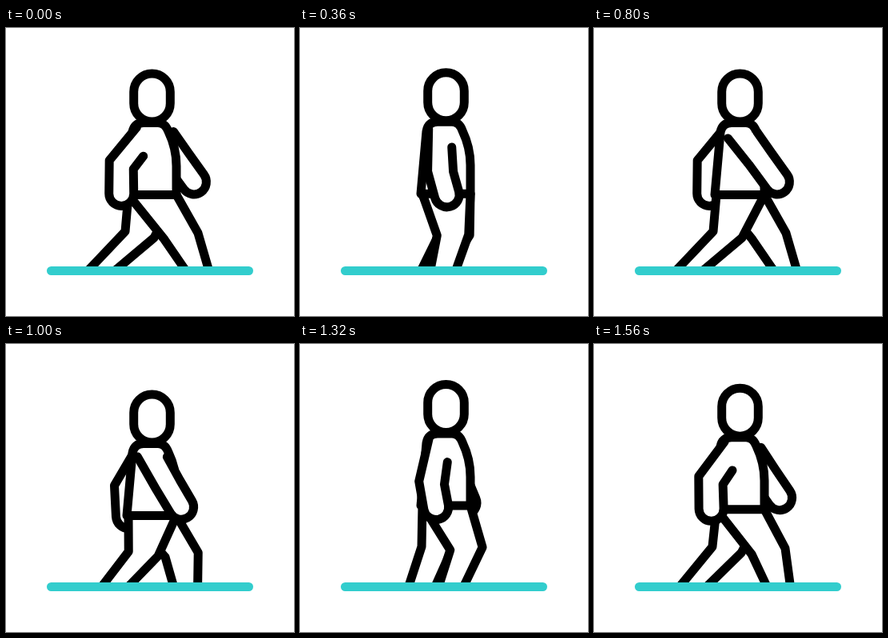
Animation, 360 px wide and 360 px high, one loop 1600 ms. Source, as an HTML page:

```html
<!DOCTYPE html>
<html lang="en">
<head>
<meta charset="utf-8">
<title>Walking figure</title>
<style>
  html, body { margin: 0; width: 100%; height: 100%; overflow: hidden; background: #fff; }
  svg { display: block; width: 100%; height: 100%; }
  .ink { fill: #fff; stroke: #000; stroke-width: 11; stroke-linecap: round; stroke-linejoin: round; }
</style>
</head>
<body>
<svg viewBox="0 0 360 360">
  <g class="ink">
    <path id="farArm"/>
    <path id="farLeg"/>
    <path id="nearLeg"/>
    <g id="body">
      <path d="M213 208H151L158 130Q160 118 172 118H190Q199 118 203 129Q213 150 213 172Z"/>
      <rect x="159.7" y="56.5" width="45.6" height="60" rx="22.8"/>
    </g>
    <path id="nearArm"/>
  </g>
  <path d="M56.5 303.5H303.5" stroke="#32cdcd" stroke-width="11" stroke-linecap="round"/>
</svg>
<script>
const LOOP = 1600, STEP = 40, KEY = 200;
const FLOOR = 298, GROUND = 303.5, HIP = 208;
const RAD = Math.PI / 180;
const el = id => document.getElementById(id);

// Samples a cyclic curve at key poses and joins them linearly.
const keyed = curve => t => {
  const i = Math.floor(t / KEY), k = t / KEY - i;
  const at = n => curve(n * KEY / LOOP * 360);
  return at(i) * (1 - k) + at(i + 1) * k;
};
const cos = deg => Math.cos(deg * RAD);
const sin = deg => Math.sin(deg * RAD);

const swing = keyed(a => cos(a));
const bobAt = keyed(a => -1 + 7.6 * cos(2 * a - 79));
const footX = keyed(a => 177.2 + 52.4 * cos(a - 3) + 6.3 * cos(2 * a - 55) + 7.9 * cos(3 * a - 64));
const kneeX = keyed(a => 192 + 31 * cos(a + 8) + 3.8 * cos(2 * a - 75) + 5.5 * cos(3 * a - 149));

// Moves from p by a length, with the angle measured from straight down.
const reach = (p, len, deg) => [p[0] + len * sin(deg), p[1] + len * cos(deg)];

// The two ends of a cut across a limb.
const cut = (p, half, deg) => [-half, half].map(h => [p[0] + h * cos(deg), p[1] + h * sin(deg)]);

const poly = points => "M" + points.map(p => p.join(" ")).join("L");

function legPath(t, bob) {
  const s = swing(t), knee = kneeX(t), foot = footX(t);
  const edge = (hip, side) => {
    const kx = knee + side * (19.5 + 1.5 * s);
    const ky = 259 + 0.6 * bob + (side < 0 ? 5 : -3) * s;
    const fx = foot + side * (16.5 - s);
    // Run on to the middle of the ground bar, which hides the sole.
    const run = (GROUND - ky) / (FLOOR - ky);
    return [[hip, HIP + bob], [kx, ky], [kx + (fx - kx) * run, GROUND]];
  };
  return poly([...edge(153, -1), ...edge(213, 1).reverse()]);
}

function armPath(t, bob, far) {
  let s = -swing(t), dx = 0;
  if (far) {
    s -= 0.2 * (1 - s * s);
    dx = 3 + 3 * s;
  }
  const bend = s * s, lower = 18 + 18 * s;
  const shoulder = [176.5 + 9 * s + dx, 137.5 - 4.2 * s + bob];
  const elbow = reach(shoulder, 42 - 5 * bend, 6 + 38 * s - 7 * bend);
  const hand = reach(elbow, 30 + 6 * bend, lower);
  const [a, g] = cut(shoulder, 18.5, 32 - 45 * s);
  const [b, f] = cut(elbow, 16, -3 - 23 * s);
  const [c, d] = cut(hand, 15.5, -lower);
  return `${poly([a, b, c])}A15.5 15.5 0 0 0 ${d.join(" ")}L${f.join(" ")}L${g.join(" ")}`;
}

function draw(now) {
  const t = Math.floor((now % LOOP) / STEP) * STEP;
  const other = (t + LOOP / 2) % LOOP;
  const bob = bobAt(t);
  el("farArm").setAttribute("d", armPath(other, bob, true));
  el("farLeg").setAttribute("d", legPath(other, bob));
  el("nearLeg").setAttribute("d", legPath(t, bob));
  el("nearArm").setAttribute("d", armPath(t, bob, false));
  el("body").setAttribute("transform", `translate(0 ${bob})`);
}

let start;
function tick(now) {
  if (start === undefined) start = now;
  draw(Math.max(0, now - start));
  requestAnimationFrame(tick);
}
draw(0);
requestAnimationFrame(tick);
</script>
</body>
</html>
```
